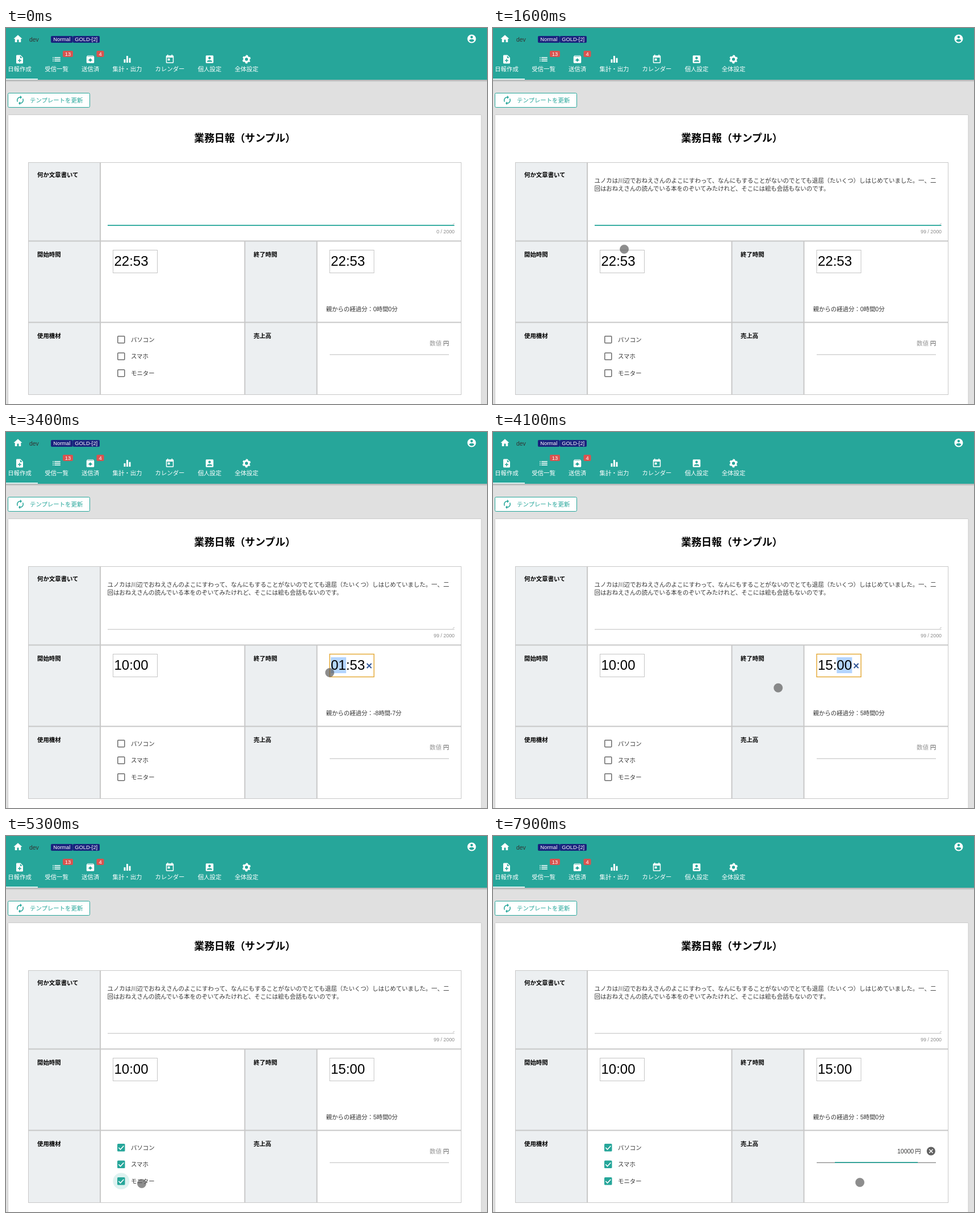
These frames come from a looping animation (847 px wide and 661 px high, 8000 ms). An HTML page:

```html
<!DOCTYPE html>
<html lang="ja">
<head>
<meta charset="utf-8">
<style>
html, body { margin: 0; width: 100%; height: 100%; overflow: hidden; background: #e0e0e0; }
svg { display: block; width: 847px; height: 661px; }
text { font-family: "Liberation Sans", "Noto Sans CJK JP", "Noto Sans CJK", sans-serif; font-size: 10.42px; fill: #333; white-space: pre; }
</style>
</head>
<body>
<svg id="stage" viewBox="0 0 847 661" xmlns="http://www.w3.org/2000/svg"></svg>
<script>
const LOOP = 8000, STEP = 100;
const TEAL = '#26a69a', LINE = '#c8c8c8';
const stage = document.getElementById('stage');

const attrs = o => Object.entries(o).map(([k, v]) => `${k}="${v}"`).join(' ');
const rect = (x, y, width, height, fill, more = {}) => `<rect ${attrs({ x, y, width, height, fill, ...more })}/>`;
const text = (x, y, str, more = {}) => `<text ${attrs({ x, y, ...more })}>${str}</text>`;
const icon = (cx, cy, d, fill = '#fff', size = 18) =>
  `<path transform="translate(${cx - size / 2} ${cy - size / 2}) scale(${size / 24})" fill="${fill}" d="${d}"/>`;
const middle = { 'text-anchor': 'middle' };
const end = { 'text-anchor': 'end' };

const ICONS = {
  home: 'M10 20v-6h4v6h5v-8h3L12 3 2 12h3v8z',
  noteAdd: 'M14 2H6c-1.1 0-2 .9-2 2v16c0 1.1.9 2 2 2h12c1.1 0 2-.9 2-2V8l-6-6zm2 14h-3v3h-2v-3H8v-2h3v-3h2v3h3v2zm-3-7V3.5L18.5 9H13z',
  list: 'M3 13h2v-2H3v2zm0 4h2v-2H3v2zm0-8h2V7H3v2zm4 4h14v-2H7v2zm0 4h14v-2H7v2zM7 7v2h14V7H7z',
  sent: 'M20.5 5.2l-1.4-1.7C18.9 3.2 18.5 3 18 3H6c-.5 0-.9.2-1.1.5L3.5 5.2C3.2 5.6 3 6 3 6.5V19c0 1.1.9 2 2 2h14c1.1 0 2-.9 2-2V6.5c0-.5-.2-.9-.5-1.3zM12 9.5l5.5 5.5H14v2h-4v-2H6.5L12 9.5zM5.1 5l.8-1h12l1 1z',
  chart: 'M10 20h4V4h-4v16zm-6 0h4v-8H4v8zM16 9v11h4V9h-4z',
  today: 'M19 3h-1V1h-2v2H8V1H6v2H5c-1.1 0-2 .9-2 2v14c0 1.1.9 2 2 2h14c1.1 0 2-.9 2-2V5c0-1.1-.9-2-2-2zm0 16H5V8h14v11zM7 10h5v5H7z',
  person: 'M3 5v14c0 1.1.9 2 2 2h14c1.1 0 2-.9 2-2V5c0-1.1-.9-2-2-2H5c-1.1 0-2 .9-2 2zm12 4c0 1.7-1.3 3-3 3s-3-1.3-3-3 1.3-3 3-3 3 1.3 3 3zm-9 8c0-2 4-3.1 6-3.1s6 1.1 6 3.1v1H6v-1z',
  account: 'M12 2C6.5 2 2 6.5 2 12s4.5 10 10 10 10-4.5 10-10S17.5 2 12 2zm0 3c1.7 0 3 1.3 3 3s-1.3 3-3 3-3-1.3-3-3 1.3-3 3-3zm0 14.2c-2.5 0-4.7-1.3-6-3.2 0-2 4-3.1 6-3.1s6 1.1 6 3.1c-1.3 1.9-3.5 3.2-6 3.2z',
  renew: 'M12 6v3l4-4-4-4v3c-4.4 0-8 3.6-8 8 0 1.6.5 3 1.2 4.3L6.7 14.8c-.5-.8-.7-1.8-.7-2.8 0-3.3 2.7-6 6-6zm6.8 1.7L17.3 9.2c.4.8.7 1.8.7 2.8 0 3.3-2.7 6-6 6v-3l-4 4 4 4v-3c4.4 0 8-3.6 8-8 0-1.6-.5-3-1.2-4.3z',
  cancel: 'M12 2C6.5 2 2 6.5 2 12s4.5 10 10 10 10-4.5 10-10S17.5 2 12 2zm5 13.6L15.6 17 12 13.4 8.4 17 7 15.6 10.6 12 7 8.4 8.4 7 12 10.6 15.6 7 17 8.4 13.4 12z'
};

const TABS = [
  [24, '日報作成', 'noteAdd'], [89, '受信一覧', 'list'], [148.5, '送信済', 'sent'], [213.5, '集計・出力', 'chart'],
  [288.5, 'カレンダー', 'today'], [358.5, '個人設定', 'person'], [423.5, '全体設定', '']
];

function gear(x, y) {
  const ring = (r, width, dash) => `<circle cx="${x}" cy="${y}" r="${r}" fill="none" stroke="#fff" stroke-width="${width}" ${dash}/>`;
  const tooth = 2 * Math.PI * 6.2 / 12;
  return ring(4.3, 3.2, '') + ring(6.2, 2.4, `stroke-dasharray="${tooth}" stroke-dashoffset="${tooth / 2}" transform="rotate(30 ${x} ${y})"`);
}

function badge(x, y, w, h, fill, label) {
  return rect(x, y, w, h, fill, { rx: 2 }) +
    text(x + w / 2, y + h / 2 + 3.3, label, { ...middle, style: 'font-size:9.3px;fill:#fff' });
}

function header() {
  const tabs = TABS.map(([x, label, name]) =>
    (name ? icon(x, 55, ICONS[name]) : gear(x, 55)) + text(x, 76, label, { ...middle, style: 'fill:#fff' })).join('');
  return [.16, .1, .05].map((o, i) => rect(0, 91 + i, 847, 1.5, '#000', { opacity: o })).join('') +
    rect(0, 0, 847, 91, TEAL) + icon(21, 19, ICONS.home) +
    text(41, 23.5, 'dev', { style: 'font-family:"Noto Sans",sans-serif;font-size:15.6px;fill:#fff' }) +
    badge(79, 14, 38.5, 12, '#1a237e', 'Normal') + badge(117.5, 14, 47.5, 12, '#1a237e', 'GOLD-[2]') +
    icon(820, 19, ICONS.account) + tabs +
    badge(100, 40, 18, 11, '#d9534f', '13') + badge(159.5, 40, 13, 11, '#d9534f', '4') +
    rect(0, 89, 56, 1.7, '#fff');
}

function sheet() {
  const bold = (x, y, str) => text(x, y, str, { 'font-weight': 700, style: 'fill:#000' });
  return rect(3.5, 114.5, 144, 25, '#fff', { rx: 2, stroke: TEAL }) + icon(25, 127, ICONS.renew, TEAL) +
    text(42, 130.5, 'テンプレートを更新', { style: `fill:${TEAL}` }) +
    rect(3.5, 152.5, 833.5, 520, '#fff', { stroke: '#cacaca', rx: 1 }) +
    text(420.5, 200, '業務日報（サンプル）', { ...middle, 'font-weight': 700, style: 'font-size:17.9px;fill:#000' }) +
    rect(39, 236, 127, 408, '#eceff1') + rect(420, 375, 127, 269, '#eceff1') +
    rect(39.5, 236.5, 762, 408, 'none', { stroke: LINE }) +
    [374, 517].map(y => rect(39, y - .5, 763, 2, LINE)).join('') + rect(165, 236, 2, 408, LINE) +
    [420, 547].map(x => rect(x - .5, 375, 2, 269, LINE)).join('') +
    bold(55, 262, '何か文章書いて') + bold(55, 401.5, '開始時間') + bold(436, 401.5, '終了時間') +
    bold(55, 544.5, '使用機材') + bold(436, 544.5, '売上高');
}

const scenery = header() + sheet();

// Latest value whose start time has passed
const at = (t, steps) => steps.reduce((value, [start, next]) => t >= start ? next : value, null);

function along(t, keys) {
  const i = keys.findIndex(k => k[0] > t);
  if (i < 0) return keys[keys.length - 1].slice(1);
  if (i === 0) return null;
  const [a, b] = [keys[i - 1], keys[i]];
  const p = (t - a[0]) / (b[0] - a[0]);
  return [1, 2].map(n => a[n] + (b[n] - a[n]) * p);
}

const POINTER = [
  [300, 804, 608], [700, 340, 292], [900, 340, 292], [1000, 334, 292], [1700, 214, 405], [1800, 204, 431],
  [2600, 204, 431], [2700, 300, 460], [2800, 465, 467], [2900, 570, 423], [4000, 570, 423],
  [4500, 231, 557], [4600, 231, 559], [4900, 235, 581], [5200, 238, 609], [5300, 239, 611], [5400, 239, 611],
  [5800, 690, 565], [7300, 690, 565], [7800, 646, 609]
];

function note(t) {
  const focused = t < 1800, filled = t >= 900;
  const caret = t >= 300 && t < 900 && Math.floor((t - 300) / 200) % 2 === 0;
  return (filled
    ? text(178.5, 272, 'ユノカは川辺でおねえさんのよこにすわって、なんにもすることがないのでとても退屈（たいくつ）しはじめていました。一、二') +
      text(178.5, 285.5, '回はおねえさんの読んでいる本をのぞいてみたけれど、そこには絵も会話もないのです。') : '') +
    (caret ? rect(179, 263, 1, 13, '#333') : '') +
    '<path d="M787 345.5l2.5-2.5" stroke="#999" stroke-width=".8"/>' +
    (focused ? rect(179, 346, 610.5, 1.8, TEAL) : rect(179, 346.5, 610.5, 1, '#bdbdbd')) +
    text(790, 360.5, (filled ? 99 : 0) + ' / 2000', { ...end, style: 'font-size:8.9px;fill:#8a8a8a' });
}

function timeField(x, value, part) {
  const focused = part !== null;
  const selection = focused ? rect(x + 2.5 + (part ? 33.3 : 0), 396, 27, 28, '#b4d5fe') : '';
  const clear = focused
    ? `<path d="M${x + 66} 407l8 8m0-8l-8 8" stroke="#2f5597" stroke-width="2"/>` : '';
  return rect(x + .5, 390.5, 78, 40, '#fff', { stroke: focused ? '#e3a62f' : '#c4c4c4', 'stroke-width': focused ? 1.4 : 1 }) +
    selection + text(x + 2.5, 418.3, value, { style: 'font-size:24px;fill:#000' }) + clear;
}

function times(t) {
  const startTime = at(t, [[0, '22:53'], [2200, '10:53'], [2400, '10:00']]);
  const endTime = at(t, [[0, '22:53'], [3400, '01:53'], [3600, '15:53'], [3800, '15:00']]);
  const minutes = s => s.slice(0, 2) * 60 + +s.slice(3);
  const gap = minutes(endTime) - minutes(startTime);
  return timeField(188, startTime, at(t, [[0, null], [1700, 0], [2200, 1], [2900, null]])) +
    timeField(569.5, endTime, at(t, [[0, null], [2900, 0], [3600, 1], [4500, null]])) +
    text(563.5, 497.5, `親からの経過分：${Math.trunc(gap / 60)}時間${gap % 60}分`);
}

function checks(t) {
  const ringed = at(t, [[0, -1], [4500, 0], [4800, 1], [5200, 2], [5800, -1]]);
  return ['パソコン', 'スマホ', 'モニター'].map((label, i) => {
    const y = 547.8 + i * 29.5, on = t >= [4500, 4800, 5200][i];
    return (ringed === i ? `<circle cx="202.8" cy="${y}" r="14.5" fill="#def2f0"/>` : '') +
      (on
        ? rect(196, y - 6.7, 13.5, 13.5, TEAL, { rx: 1.5 }) +
          `<path d="M198.3 ${y}l3.2 3.2 5.8-6.2" fill="none" stroke="#fff" stroke-width="1.6"/>`
        : rect(196.8, y - 6, 12, 12, '#fff', { rx: 1, stroke: '#6b6b6b', 'stroke-width': 1.5 })) +
      text(220, y + 4, label);
  }).join('');
}

function sales(t) {
  const amount = at(t, [[0, ''], [6600, '1'], [6800, '10'], [6900, '100'], [7000, '1000'], [7200, '10000']]);
  const caret = t >= 6000 && t < 6600 && Math.floor(t / 200) % 2 === 0;
  const grow = at(t, [[0, 0], [5900, .6], [6000, 1], [7900, .695]]);
  const hover = t >= 5800;
  return (amount
    ? text(741, 557.5, amount, end) + text(743, 557.5, '円') +
      `<g opacity="${t < 6700 ? .5 : 1}">${icon(771.3, 554, ICONS.cancel, '#616161')}</g>`
    : text(746, 557.5, '数値', { style: 'fill:#999' }) + text(769.7, 557.5, '円', { style: 'fill:#555' })) +
    (caret ? rect(766, 548, 1, 12, '#333') : '') +
    rect(570, 573.7, 210, 1, hover ? '#666' : '#bdbdbd') +
    rect(675 - 105 * grow, 573, 210 * grow, 1.7, TEAL);
}

function pointer(t) {
  const p = along(t, POINTER);
  return p ? `<circle cx="${p[0]}" cy="${p[1]}" r="7.7" fill="#555" fill-opacity=".67" stroke="#777" stroke-opacity=".4"/>` : '';
}

stage.innerHTML = scenery + '<g id="live"></g>';
const live = document.getElementById('live');
let shown = -1;

function draw(now) {
  const t = Math.floor(now % LOOP / STEP) * STEP;
  if (t !== shown) {
    shown = t;
    live.innerHTML = note(t) + times(t) + checks(t) + sales(t) + pointer(t);
  }
}

const origin = performance.now();
function tick() {
  draw(performance.now() - origin);
  requestAnimationFrame(tick);
}
tick();
</script>
</body>
</html>
```
